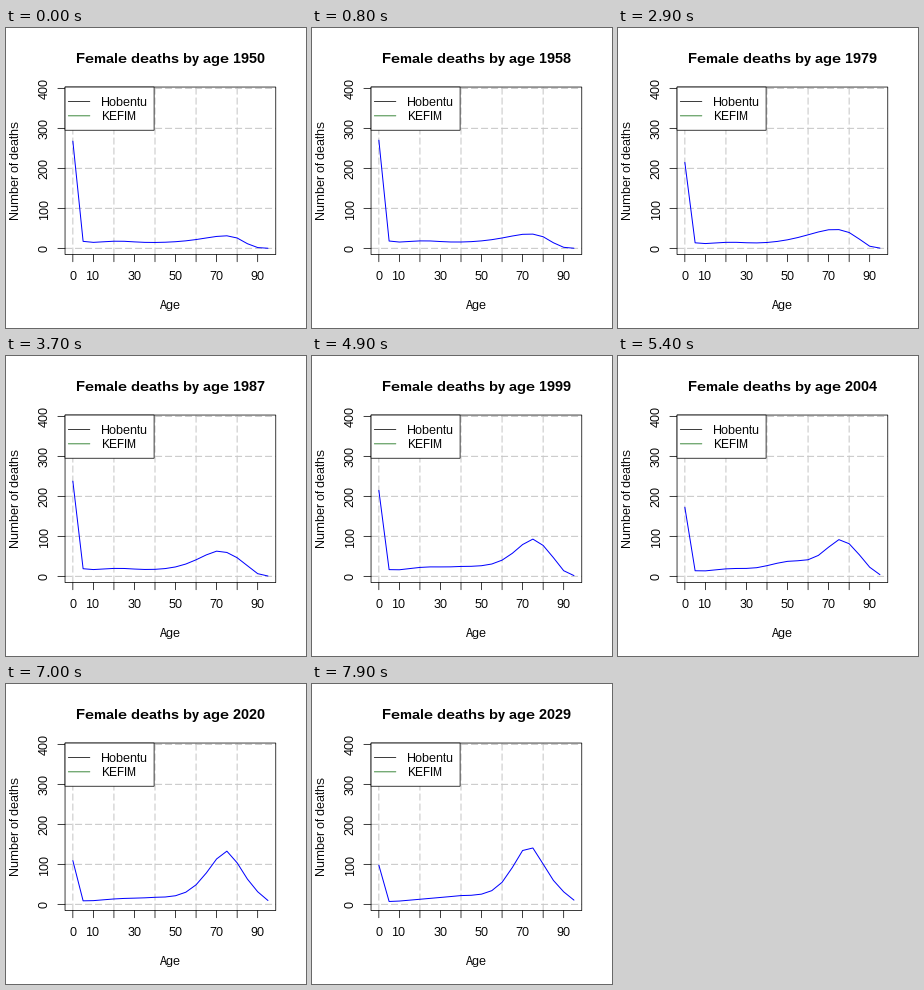
Recreate the animation shown at these times as a matplotlib script. Size 300 by 300 pixels, loop 8000 ms.

```python
import numpy as np
import matplotlib.pyplot as plt
from matplotlib.animation import FuncAnimation
from matplotlib.patches import Rectangle

SIZE, DPI = 300, 100
PX = 72 / DPI                    # points per pixel
LINE = 14.4                      # height of one margin line
L, R, T, B = 59.04, 269.76, 59.04, 226.56
THIN = 0.75
AGES = np.arange(0, 100, 5)
FIRST_YEAR, YEARS = 1950, 80

# Key years for the shape parameters of the curve.
KEYS = [1950, 1965, 1979, 1987, 1999, 2010, 2029]

plt.rcParams.update({"font.family": "Liberation Sans",
                     "text.hinting": "default",
                     "text.hinting_factor": 1})
fig = plt.figure(figsize=(SIZE / DPI, SIZE / DPI), dpi=DPI, facecolor="white")
ax = fig.add_axes([0, 0, 1, 1])
ax.set(xlim=(0, SIZE), ylim=(SIZE, 0))
ax.axis("off")


def bump(x, centre, width, power=2.0):
    return np.exp(-np.abs((x - centre) / width) ** power)


def deaths(year):
    """Infant spike, flat adult level, ageing cohort and old-age peak."""
    def key(*values):
        return np.interp(year, KEYS, values)

    infant = key(254, 257, 204, 222, 201, 113, 92) * np.exp(-AGES / 1.15)
    level = key(14, 15.5, 11, 16, 14, 9, 6)
    slope = key(0, 0, 0, 0, 0.3, 0.1, 0.45)
    height = key(18, 25, 37, 48, 69, 80, 126)
    peak = key(75, 72, 73, 71.5, 75, 77.5, 73)
    width = key(17, 17, 20, 15, 12, 11, 11)
    youth = np.interp(year, [2010, 2029], [4, 0])
    cohort = np.interp(year, [1999, 2010, 2029], [0, 38, 0])
    oldest = np.interp(year, [1950, 1979, 1999, 2010], [84.5, 86.5, 88.5, 94])

    adult = (level + slope * np.clip(AGES - 5, 0, 35)
             + youth * bump(AGES, 22, 10)
             + cohort * bump(AGES, year - 1953, 12)
             + height * bump(AGES, peak, width, 1.7))
    return infant + adult / (1 + np.exp((AGES - oldest) / 2.4))


def sx(age):
    return L + (age + 3.8) * (R - L) / 102.6


def sy(n):
    return 220.36 - 0.4 * n


def line(xs, ys, color="black", z=2, width=THIN, **kw):
    return ax.plot(xs, ys, color=color, lw=width * PX, zorder=z, snap=False,
                   solid_capstyle="round", solid_joinstyle="round", **kw)[0]


def box(x0, y0, x1, y1, fill, z):
    ax.add_patch(Rectangle((x0, y0), x1 - x0, y1 - y0, fc=fill, ec="black",
                           lw=THIN * PX, zorder=z, snap=False))


def text(x, y, s, size=12, ha="center", **kw):
    return ax.text(x, y, s, fontsize=size * PX, ha=ha, va="baseline",
                   zorder=6, **kw)


def upright(x, y, s):
    text(x, y, s, rotation=90, rotation_mode="anchor")


def grid(xs, ys):
    line(xs, ys, "#c6c6c6", 1, 1, dashes=(7, 3), dash_capstyle="butt")


for age in range(0, 100, 20):
    grid([sx(age)] * 2, [B, T])
for n in range(0, 500, 100):
    grid([L, R], [sy(n)] * 2)
    line([L, L - LINE / 2], [sy(n)] * 2)
    upright(L - 1.2 * LINE, sy(n), str(n))
for age in range(0, 100, 10):
    line([sx(age)] * 2, [B, B + LINE / 2])
    if age == 0 or age % 20:
        text(sx(age), B + 1.8 * LINE, str(age))

box(L, T, R, B, "none", 4)
text((L + R) / 2, B + 3.8 * LINE, "Age")
upright(L - 3.2 * LINE, (T + B) / 2, "Number of deaths")

box(L, T, 148.1, T + 3 * LINE, "white", 4)
for row, (name, color) in enumerate([("Hobentu", "black"),
                                     ("KEFIM", "darkgreen")], 1):
    y = T + row * LINE
    line([62.28, 83.88], [y, y], color, 5)
    text(94.7, y + 4.4, name, ha="left")

title = text((L + R) / 2, 34.7, "", 14.4, weight="bold")
curve = line(sx(AGES), sy(deaths(FIRST_YEAR)), "blue", 3, 1)


def update(i):
    year = FIRST_YEAR + i
    title.set_text(f"Female deaths by age {year}")
    curve.set_ydata(sy(deaths(year)))
    return title, curve


anim = FuncAnimation(fig, update, frames=YEARS, interval=100,
                     repeat=True, repeat_delay=0)
plt.show()
```
